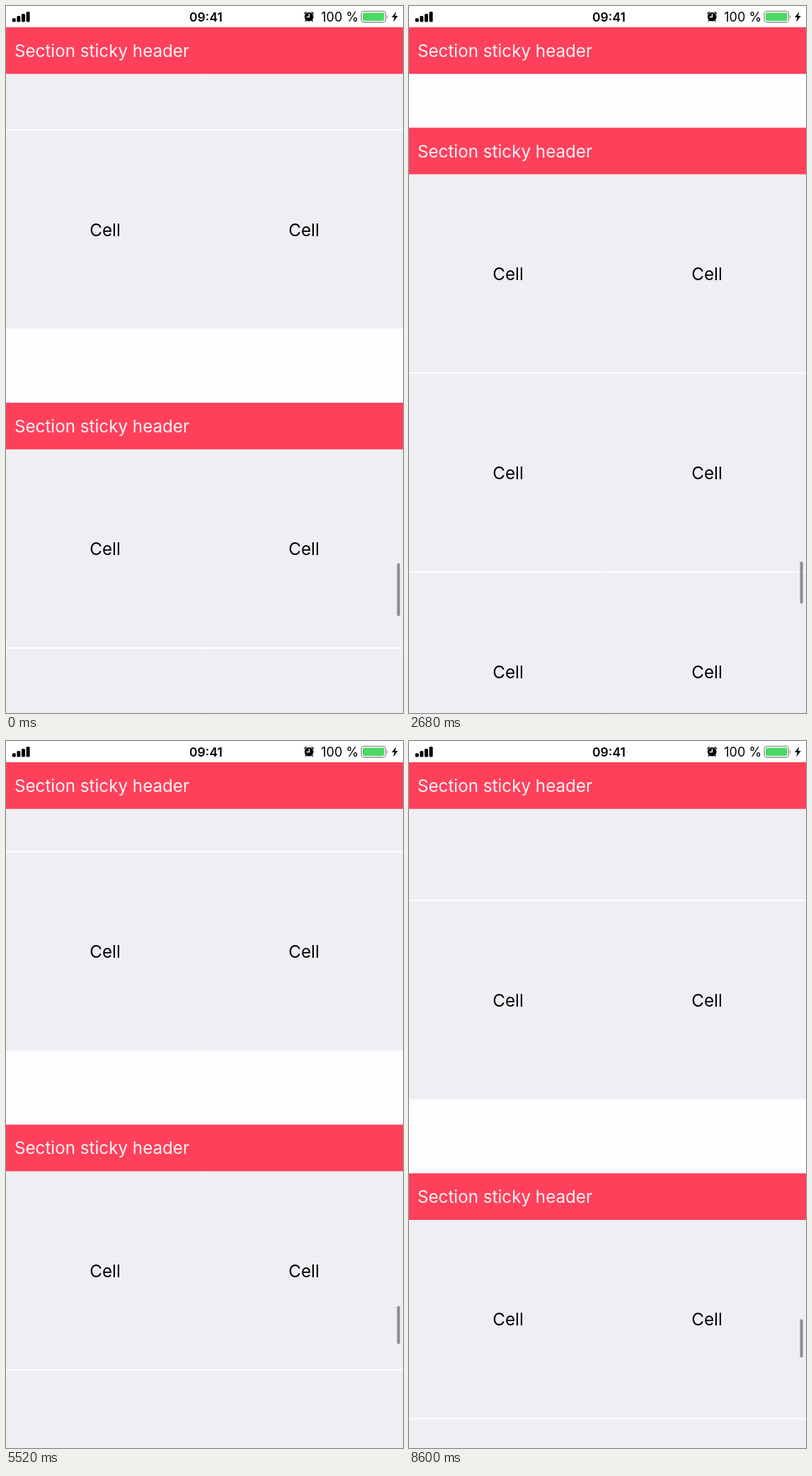
An HTML page that plays this animation: 561 by 998 pixels, repeating every 8640 ms.

```html
<!DOCTYPE html>
<html lang="en">
<head>
<meta charset="utf-8">
<title>Sticky headers with infinite scroll</title>
<style>
  html, body { margin: 0; width: 100%; height: 100%; overflow: hidden; background: #fefdff; }
  svg { display: block; width: 100%; height: 100%; }
  text { font-family: Inter, Roboto, sans-serif; font-size: 24.2px; }
</style>
</head>
<body>
<svg viewBox="0 0 561 998">
  <rect width="561" height="998" fill="#fefdff"/>
  <g id="cells"></g>
  <g id="spinner" stroke-width="4.5" stroke-linecap="round"></g>
  <g id="headers"></g>
  <rect id="bar" x="552.5" width="4.2" rx="2.1" fill="#8f8e93"/>
  <g>
    <rect width="561" height="30" fill="#fff"/>
    <g id="signal"></g>
    <text x="282.5" y="21.5" text-anchor="middle" style="font-size:17.5px;font-weight:600">09:41</text>
    <g stroke="#000" stroke-linecap="round" fill="none">
      <circle cx="428.2" cy="15.2" r="6.3" fill="#000" stroke="none"/>
      <path d="M421.9 10.8l2.3-2.1M434.5 10.8l-2.3-2.1M424 20.4l-.8.8M432.4 20.4l.8.8" stroke-width="1.5"/>
      <path d="M428.4 11.5v4h-3.2" stroke="#fff" stroke-width="1.4"/>
    </g>
    <text x="445.3" y="21.7" style="font-size:18px">100 %</text>
    <rect x="502" y="7.4" width="34.5" height="15.6" rx="4" fill="none" stroke="#8d8d8d" stroke-width="1.3"/>
    <rect x="504" y="9.4" width="30.5" height="11.6" rx="2.4" fill="#4cd964"/>
    <path d="M538.2 12.4q2.4 2.8 0 5.6z" fill="#8d8d8d"/>
    <path d="M551.4 8l-6.4 8h3.8l-1.6 6.4 6.6-8.4h-3.9z"/>
  </g>
</svg>
<script>
(() => {
  const LOOP = 8640, STEP = 40, SCREEN = 998, STATUS = 30;
  const HEADER = 65.8, CELL = 279.75, PITCH = 281.25, FOOTER = 104.7;
  const BAR = { top: 33, bottom: 993, min: 54, squashed: 10 };
  const FIRST_CONTENT = 12400;

  const byId = id => document.getElementById(id);
  function add(parent, tag, attrs, text) {
    const node = document.createElementNS('http://www.w3.org/2000/svg', tag);
    for (const key in attrs) node.setAttribute(key, attrs[key]);
    if (text) node.textContent = text;
    parent.appendChild(node);
    return node;
  }

  // Rows per section, and the moment each section is loaded.
  const sections = [
    { rows: 11, loaded: 0 },
    { rows: 7, loaded: 0 },
    { rows: 11, loaded: 2240 },
    { rows: 11, loaded: 5200 },
    { rows: 11, loaded: 8200 }
  ];

  function buildSection(s) {
    const bodyHeight = s.rows * PITCH - 1.5;
    s.height = HEADER + bodyHeight + FOOTER;
    s.body = add(byId('cells'), 'g', {});
    add(s.body, 'rect', { y: HEADER, width: 561, height: bodyHeight, fill: '#efeef3' });
    add(s.body, 'rect', { x: 280.2, y: HEADER, width: 1.2, height: bodyHeight, fill: '#fff', opacity: 0.3 });
    for (let r = 0; r < s.rows; r++) {
      const y = HEADER + r * PITCH;
      if (r) add(s.body, 'rect', { y: y - 1.6, width: 561, height: 1.7, fill: '#fff' });
      for (const x of [140, 421])
        add(s.body, 'text', { x, y: y + CELL / 2 + 9.4, 'text-anchor': 'middle' }, 'Cell');
    }
    s.header = add(byId('headers'), 'g', {});
    add(s.header, 'rect', { width: 561, height: HEADER, fill: '#ff405b' });
    add(s.header, 'text', { x: 12, y: 41.8, fill: '#fff4f6' }, 'Section sticky header');
  }

  sections.forEach(buildSection);
  sections.reduce((y, s) => (s.top = y) + s.height, -sections[0].height);

  for (let i = 0; i < 4; i++) {
    const h = 5.2 + i * 3.1;
    add(byId('signal'), 'rect', { x: 8.8 + i * 6.6, y: 22.4 - h, width: 5, height: h, rx: 1.5 });
  }

  const spokes = Array.from({ length: 12 }, (_, i) =>
    add(byId('spinner'), 'line', { y1: -13.5, y2: -24, transform: `rotate(${i * 30})` }));

  // Scroll positions: drags, flings and bounces as [time, offset].
  const path = [
    [0, -560], [80, -470], [180, -180], [400, 760], [510, 1140], [650, 1510], [750, 1590],
    [950, 1548], [1200, 1527], [1900, 1527], [2040, 1583.5], [2240, 1630], [2520, 1700],
    [2680, 1966], [2800, 2360], [3370, 4403], [3520, 4775], [3610, 4860], [3720, 4828],
    [3900, 4800], [4200, 4790], [5380, 4790], [5520, 4859], [5620, 5060], [5800, 5680],
    [6400, 7666], [6540, 8030], [6640, 8110], [6800, 8070], [7000, 8053], [7320, 8053],
    [7480, 8179], [7560, 8190], [7720, 8090], [7920, 8053], [8640, 8053]
  ];
  const slope = i => (path[i + 1][1] - path[i][1]) / (path[i + 1][0] - path[i][0]);
  const tangents = path.map((_, i) => {
    if (i === 0) return slope(0);
    if (i === path.length - 1) return 0;
    const a = slope(i - 1), b = slope(i);
    return a * b > 0 ? 2 * a * b / (a + b) : 0;
  });

  function scrollAt(t) {
    let i = 0;
    while (i < path.length - 2 && t >= path[i + 1][0]) i++;
    const [t0, y0] = path[i], [t1, y1] = path[i + 1];
    const d = t1 - t0, u = (t - t0) / d, v = 1 - u;
    return y0 * (1 + 2 * u) * v * v + y1 * u * u * (3 - 2 * u)
      + d * u * v * (tangents[i] * v - tangents[i + 1] * u);
  }

  // Returns the end of the loaded content.
  function drawSections(t, offset) {
    let end = 0;
    for (const s of sections) {
      const loaded = t >= s.loaded;
      const y = s.top - offset, bottom = y + s.height;
      const visible = loaded && y < SCREEN && bottom > STATUS;
      s.body.style.display = s.header.style.display = visible ? '' : 'none';
      if (loaded) end = s.top + s.height;
      const headerY = Math.min(Math.max(STATUS, y), bottom - HEADER);
      s.body.setAttribute('transform', `translate(0 ${y})`);
      s.header.setAttribute('transform', `translate(0 ${headerY})`);
    }
    return end;
  }

  function drawSpinner(t, y) {
    const start = t < 2680 ? 500 : t < 5300 ? 3512 : 6522;
    const head = Math.floor((t - start) * 0.012);
    byId('spinner').setAttribute('transform', `translate(279 ${y})`);
    spokes.forEach((spoke, i) => {
      const age = ((head - i) % 12 + 12) % 12;
      const level = Math.min(182, 30 + age * 27);
      spoke.setAttribute('stroke', `rgb(${level},${level},${level + 2})`);
    });
  }

  function drawBar(below, content) {
    const track = BAR.bottom - BAR.top, view = SCREEN - STATUS;
    let length = Math.max(BAR.min, track * view / content);
    let bottom = BAR.bottom;
    if (below < 0) length = Math.max(BAR.squashed, length + below);
    else bottom -= below / (content - view) * (track - length);
    byId('bar').setAttribute('y', bottom - length);
    byId('bar').setAttribute('height', length);
  }

  function render(t) {
    const offset = scrollAt(t);
    const end = drawSections(t, offset);
    drawSpinner(t, end - offset + 46.5);
    drawBar(end - offset - SCREEN, FIRST_CONTENT + end - sections[2].top);
  }

  const began = performance.now();
  function tick() {
    const elapsed = (performance.now() - began) % LOOP;
    render(Math.floor(elapsed / STEP) * STEP);
    requestAnimationFrame(tick);
  }
  tick();
})();
</script>
</body>
</html>
```
